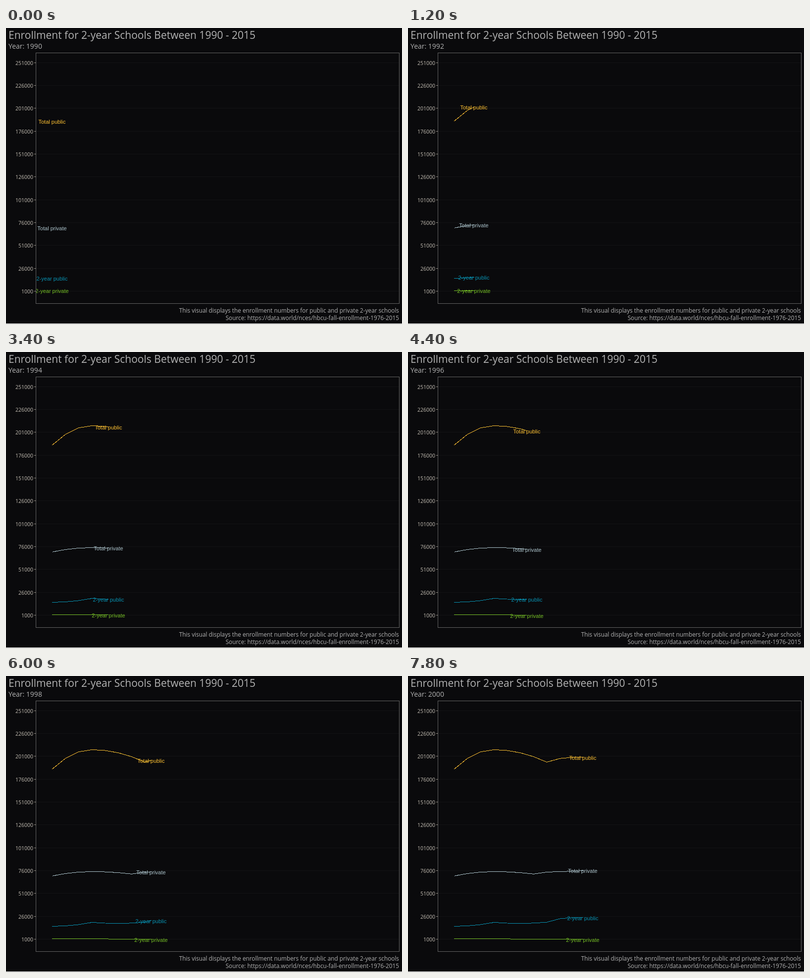
These frames come from a looping animation (800x600 px, 8 s). An HTML page:

```html
<!DOCTYPE html>
<html lang="en">
<head>
<meta charset="utf-8">
<title>Enrollment for 2-year Schools</title>
<style>
  html, body { margin: 0; width: 100%; height: 100%; overflow: hidden; background: #0a0a0c; }
  svg { display: block; width: 800px; height: 600px; }
  text { font-family: "Open Sans", sans-serif; fill: #b3b3b3; }
  .axis { font-size: 10.5px; fill: #c4beb4; text-anchor: end; }
  .caption { font-size: 11.8px; text-anchor: end; }
  .series text { font: 11px "Liberation Sans", Arial, sans-serif; text-anchor: middle; }
  path, polyline, rect { shape-rendering: crispEdges; fill: none; }
</style>
</head>
<body>
<svg viewBox="0 0 800 600">
  <clipPath id="panel"><rect x="60" y="50" width="735" height="509"/></clipPath>
  <text x="5" y="22" font-size="21">Enrollment for 2-year Schools Between 1990 - 2015</text>
  <text id="year" x="5" y="42" font-size="14"></text>
  <g id="grid"></g>
  <g id="plot" clip-path="url(#panel)"></g>
  <rect x="60.5" y="50.5" width="734" height="508" stroke="#646464"/>
  <text class="caption" x="794" y="577">This visual displays the enrollment numbers for public and private 2-year schools</text>
  <text class="caption" x="794" y="592">Source: https://data.world/nces/hbcu-fall-enrollment-1976-2015</text>
  <path d="M0 599.5H800" stroke="#fff"/>
</svg>
<script>
const LOOP = 8000, STEP = 200, FIRST_YEAR = 1990;
const LEFT = 93.5, YEAR_WIDTH = 26.69;

const easeIn = u => u * u;
const easeOut = u => 1 - (1 - u) ** 2;

// Turning points as [years since 1990, height]; the two eases alternate between them
const series = [
  { name: "Total public", color: "#ffc233", eases: [easeOut, easeIn],
    turns: [[0, 188.6], [3, 149.4], [7, 174.5], [9, 164.8]] },
  { name: "Total private", color: "#adc4cc", eases: [easeOut, easeIn],
    turns: [[0, 405.3], [3, 396.5], [6, 401.3], [8, 396.3], [10, 394]] },
  { name: "2-year public", color: "#0892b2", eases: [easeIn, easeOut],
    turns: [[0, 507.4], [3, 499.5], [5, 501.5], [7, 499.1], [9, 489.6]] },
  { name: "2-year private", color: "#76c026", eases: [easeIn, easeOut],
    turns: [[0, 532.2], [6, 533.8]] }
];

function heightAt({ turns, eases }, year) {
  const next = turns.findIndex(([turnYear]) => turnYear > year);
  if (next < 0) return turns.at(-1)[1];
  const [x0, y0] = turns[next - 1], [x1, y1] = turns[next];
  return y0 + (y1 - y0) * eases[(next - 1) % 2]((year - x0) / (x1 - x0));
}

function add(parent, tag, attributes, content = "") {
  const node = document.createElementNS("http://www.w3.org/2000/svg", tag);
  for (const key in attributes) node.setAttribute(key, attributes[key]);
  node.textContent = content;
  return parent.appendChild(node);
}

const grid = document.getElementById("grid");
for (let i = 0; i <= 10; i++) {
  const y = 70 + Math.floor(i * 139 / 3);
  add(grid, "path", { d: `M61 ${y + 0.5}H794`, stroke: "#131315" });
  add(grid, "path", { d: `M57 ${y + 0.5}H60`, stroke: "#a39c92" });
  add(grid, "text", { class: "axis", x: 55, y: y + 5 }, 251000 - i * 25000);
}

const plot = document.getElementById("plot");
for (const item of series) {
  const group = add(plot, "g", { class: "series" });
  item.line = add(group, "polyline", { stroke: item.color });
  item.label = add(group, "text", { style: `fill: ${item.color}` }, item.name);
}

const xAt = years => LEFT + years * YEAR_WIDTH;

// Lines bend only at whole years; the head moves straight from one to the next
function draw(step) {
  const elapsed = step / 4, whole = Math.floor(elapsed);
  const headX = xAt(elapsed);
  for (const item of series) {
    const from = heightAt(item, whole), to = heightAt(item, whole + 1);
    const headY = from + (to - from) * (elapsed - whole);
    const points = Array.from({ length: whole + 1 }, (_, i) => [xAt(i), heightAt(item, i)]);
    points.push([headX, headY]);
    item.line.setAttribute("points", step ? points.join(" ") : "");
    item.label.setAttribute("x", Math.round(headX - 0.3));
    item.label.setAttribute("y", Math.round(headY + 5));
  }
  document.getElementById("year").textContent = "Year: " + Math.round(FIRST_YEAR + elapsed);
}

const start = performance.now();
function tick() {
  draw(Math.floor((performance.now() - start) % LOOP / STEP));
  requestAnimationFrame(tick);
}
tick();
</script>
</body>
</html>
```
